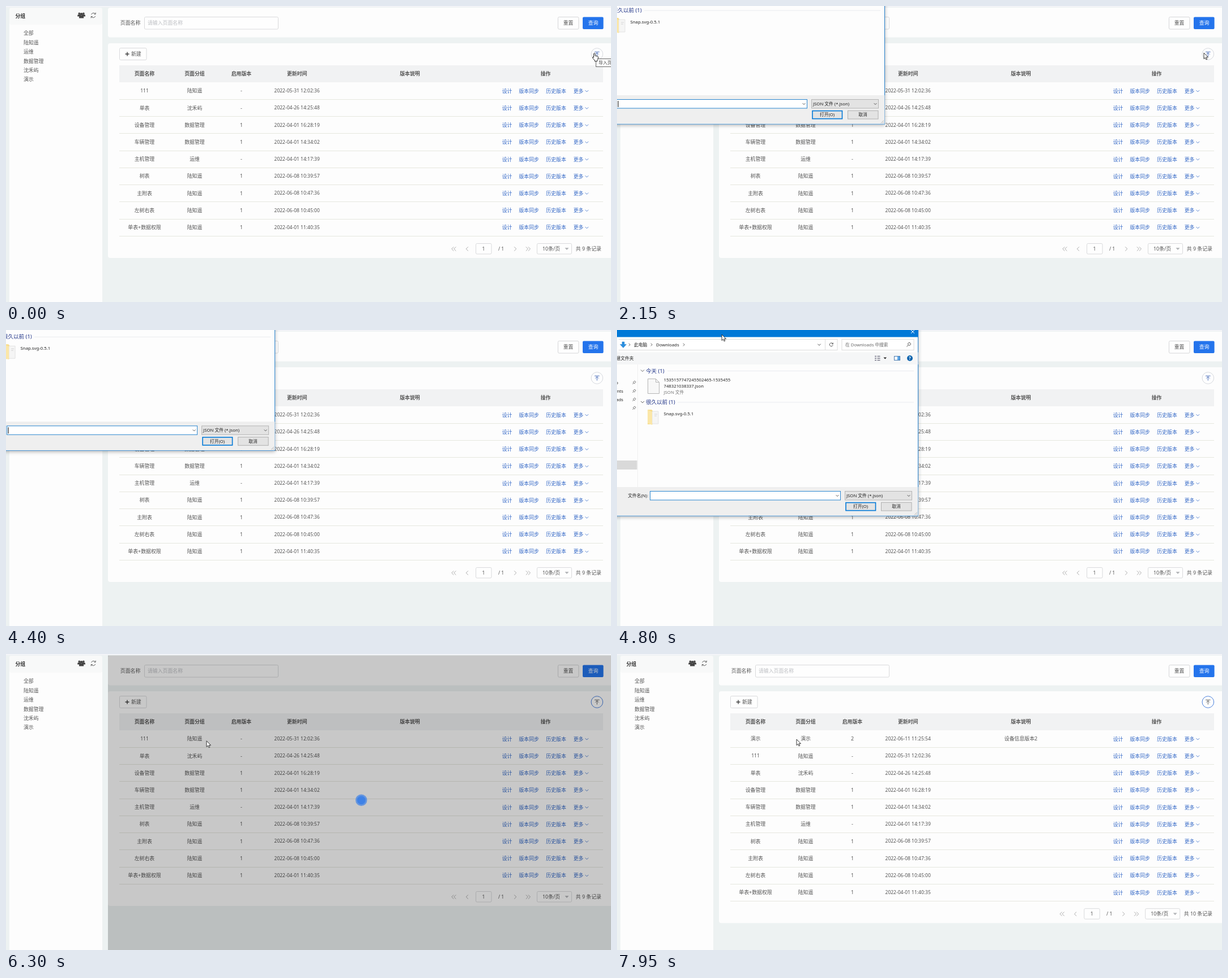
Write an HTML page that moves like this. It is 1068 px wide and 524 px high and loops after 8000 ms.

```html
<!DOCTYPE html>
<html lang="zh-CN">
<head>
<meta charset="utf-8">
<style>
html, body { margin: 0; width: 100%; height: 100%; overflow: hidden; background: #edf2f2; }
svg { display: block; width: 100%; height: 100%; }
text { font: 8.9px "Noto Sans", "Noto Sans CJK SC", "Noto Sans CJK", sans-serif; white-space: pre; }
</style>
</head>
<body>
<svg id="stage" viewBox="0 0 1068 524" xmlns="http://www.w3.org/2000/svg"></svg>
<script>
const BLUE = '#2474ec', LINK = '#3267c6', INK = '#555', WIN = '#0078d7';
const LOOP = 8000;

// Markup helpers; text y is the visual middle of the line
const rect = (x, y, w, h, fill, stroke = 'none', rx = 0, more = '') =>
  `<rect x="${x}" y="${y}" width="${w}" height="${h}" fill="${fill}" stroke="${stroke}" rx="${rx}" ${more}/>`;
const path = (d, stroke, width = 1, fill = 'none', more = '') =>
  `<path d="${d}" stroke="${stroke}" stroke-width="${width}" fill="${fill}" ${more}/>`;
const text = (x, y, s, o = {}) => {
  const { size = 8.9, fill = INK, anchor = 'start', bold = 0 } = o;
  return `<text x="${x}" y="${y + size * .37}" fill="${fill}" text-anchor="${anchor}" ` +
    `style="font-size:${size}px;font-weight:${bold ? 700 : 400}">${s}</text>`;
};
const mid = (x, y, s, o) => text(x, y, s, { anchor: 'middle', ...o });
const chevron = (x, y, dx, dy, color, w = 1) => dx
  ? path(`M${x - dx} ${y - dy}L${x + dx} ${y}L${x - dx} ${y + dy}`, color, w)
  : path(`M${x - dy} ${y - dy / 2}L${x} ${y + dy / 2}L${x + dy} ${y - dy / 2}`, color, w);
const group = (id, s) => `<g id="${id}">${s}</g>`;

const ANN = '陆知遥', BEN = '沈禾屿', DATA = '数据管理';
const oldRows = [
  ['111', ANN, '-', '2022-05-31 12:02:36'],
  ['单表', BEN, '-', '2022-04-26 14:25:48'],
  ['设备管理', DATA, '1', '2022-04-01 16:28:19'],
  ['车辆管理', DATA, '1', '2022-04-01 14:34:02'],
  ['主机管理', '运维', '-', '2022-04-01 14:17:39'],
  ['树表', ANN, '1', '2022-06-08 10:39:57'],
  ['主附表', ANN, '1', '2022-06-08 10:47:36'],
  ['左树右表', ANN, '1', '2022-06-08 10:45:00'],
  ['单表+数据权限', ANN, '1', '2022-04-01 11:40:35']
];
const newRows = [['演示', '演示', '2', '2022-06-11 11:25:54', '设备信息版本2'], ...oldRows];
const columns = [244.5, 333, 415.5, 513.7, 713];

function person(x, y, r) {
  return `<circle cx="${x}" cy="${y}" r="${r}"/>` +
    `<path d="M${x - r * 1.7} ${y + r * 3}v${-r}q0 ${-r} ${r} ${-r}h${r * 1.4}q${r} 0 ${r} ${r}v${r}z"/>`;
}

function sidebar() {
  const items = ['全部', ANN, '运维', DATA, BEN, '演示'];
  return rect(6, 3, 164, 540, '#fdfdfd', 'none', 4) + rect(6, 3, 164, 30, '#f8f9f9', 'none', 4) +
    text(16.5, 17.5, '分组', { bold: 1, fill: '#333' }) +
    `<g fill="#444">${person(129.3, 13.2, 1.8)}${person(136.9, 13.2, 1.8)}${person(133.1, 14.3, 2.4)}</g>` +
    path('M150.6 15.2a4 4 0 0 1 7.2-1M157.8 17.8a4 4 0 0 1-7.2 1M158.2 11.6v2.8h-2.8M150.2 21.4v-2.8h2.8', '#555', .9) +
    items.map((s, i) => text(31, 48.2 + i * 16.4, s)).join('');
}

function searchBar() {
  return rect(180, 3, 900, 52.5, '#fdfdfd', 'none', 4) +
    text(201.8, 30, '页面名称') + rect(244.5, 19.5, 236, 21.5, '#fefefe', '#d9dadc', 2) +
    text(250, 30, '请输入页面名称', { fill: '#bcbec2' }) +
    rect(974.5, 19.5, 36.5, 21.5, '#fefefe', '#d5d6d8', 2) + mid(992.5, 30, '重置') +
    rect(1018, 19.5, 36.6, 21.5, BLUE, 'none', 2) + mid(1036.5, 30, '查询', { fill: '#fff' });
}

function pager(count) {
  const extra = count - 9, y = 430 + extra * 30.2, g = '#aaa';
  const arrows = chevron(788.5, y, -1.8, 3.6, g) + chevron(792.5, y, -1.8, 3.6, g) +
    chevron(814, y, -1.8, 3.6, g) + chevron(899, y, 1.8, 3.6, g) +
    chevron(919.7, y, 1.8, 3.6, g) + chevron(923.7, y, 1.8, 3.6, g);
  return `<g transform="translate(${-4.8 * extra})">` + arrows +
    rect(829.5, y - 9.5, 27.5, 18.5, '#fefefe', '#d9dadc', 2) + mid(843, y, '1', { size: 8.5 }) +
    mid(874, y, '/ 1', { size: 8.5 }) +
    rect(937.5, y - 9.5, 61, 18.5, '#fefefe', '#d9dadc', 2) + text(947, y, '10条/页') +
    path(`M986.5 ${y - 2}h7l-3.5 4z`, 'none', 0, '#b5b7ba') + '</g>' +
    text(1051, y, `共 ${count} 条记录`, { anchor: 'end' });
}

function table(rows) {
  const heads = ['页面名称', '页面分组', '启用版本', '更新时间', '版本说明'];
  let s = rect(180, 66, 900, 108 + rows.length * 30.22, '#fdfdfd', 'none', 4) +
    rect(200.5, 74.5, 47.5, 21, '#fefefe', '#d9dadc', 2) +
    path('M210.5 85h7M214 81.5v7', '#444', 1.5) + text(221, 85, '新建') +
    rect(200, 105, 854, 30, '#f1f2f3') +
    heads.map((h, i) => mid(columns[i], 119.7, h, { bold: 1 })).join('') +
    mid(952.5, 119.7, '操作', { bold: 1 });
  rows.forEach((row, i) => {
    const y = 150 + i * 30.22;
    s += row.map((c, k) => mid(columns[k], y, c, { size: k == 3 || c == '111' ? 8.5 : 8.9 })).join('') +
      [[875.7, '设计'], [905.5, '版本同步'], [953.3, '历史版本'], [1001.7, '更多']]
        .map(([x, c]) => text(x, y + .4, c, { fill: LINK })).join('') +
      chevron(1025.3, y + .6, 0, 2.8, LINK, .8) +
      path(`M200 ${Math.round(y + 15) + .5}H1054`, '#e6e7df');
  });
  return s + pager(rows.length);
}

function importIcon(ring, arrow) {
  return `<circle cx="1043.3" cy="85" r="10.3" fill="#fefefe" stroke="${ring}"/>` +
    path('M1039 81.3h8.6M1043.3 89.5v-7M1040.3 85.7l3-3 3 3', arrow, .9);
}

// Dialog drawn at its resting place
function dialog() {
  const small = { size: 7.75, fill: '#222' }, end = { ...small, anchor: 'end' };
  const header = (id, y, label, width) =>
    rect(50, y - 8.5, 491, 17, '#e5f3ff', 'none', 0, `id="${id}"`) +
    chevron(55, y, 0, 3, '#555', .9) + text(61, y, label, { size: 9.5, fill: '#1e3287' }) +
    path(`M${61 + width} ${y + .5}H534`, '#e9ebef');
  const nav = [[6, 96.5, '快速访问'], [12, 112, 'Desktop'], [21, 127, 'Documents'], [21, 142, 'Downloads'],
    [9, 157, 'Pictures'], [9, 238, 'Archive']];
  const pin = y => path(`M37.5 ${y + 3}l2.2-2.4m-1.7-1.6l3.4 3.4m-2.6-3.2l2.4-2.2 2 2-2.2 2.4`, '#777', 1);
  const frame = rect(-120, 13.5, 661.5, 334.5, '#fdfdfd', '#2680cc', 0, 'filter="url(#shadow)"') +
    rect(-120, 13, 662, 18.5, WIN) + path('M529 19l6 6M535 19l-6 6', '#fff', 1);
  const address = rect(-30, 35.5, 407.5, 19, '#fff', '#dcdcdc') + rect(377.5, 35.5, 21.5, 19, '#fff', '#dcdcdc') +
    rect(407, 35.5, 127, 19, '#fff', '#dcdcdc') +
    rect(-31, 32, 44, 26, '#fdfdfd') + path('M5.5 49v-7.5M2.5 44.5l3-3 3 3', '#555', 1) +
    path('M19 40h4v4.5h3.5L21 50.5l-5.5-6H19z', '#1979ca', .5, '#2b8fe0') +
    [32, 71, 128].map(x => chevron(x, 45, 1.2, 2.4, '#555', .9)).join('') +
    text(40, 45, '此电脑', small) + text(79, 45, 'Downloads', small) +
    chevron(367, 45, 0, 2.6, '#555', 1) +
    path('M391 43.5a3 3 0 1 0 .2 2.2M391.3 41.5v2.3h-2.3', '#444', .9) +
    text(413, 45, '在 Downloads 中搜索', { ...small, fill: '#666' }) +
    path('M521.5 48.5l2.6-2.8m.2-.2a2.4 2.4 0 1 0 3.4-3.4a2.4 2.4 0 1 0-3.4 3.4', '#555', 1);
  const tools = rect(-119, 58.5, 660.5, 21.5, '#f5f6f7') + text(39.5, 69, '新建文件夹', end) +
    [65.5, 69, 72.5].map(y => path(`M465 ${y}h3M469.5 ${y}h5`, '#778', 1.4)).join('') +
    path('M480.5 67.5h5.5l-2.7 3z', 'none', 0, '#222') +
    rect(499.5, 65.5, 10, 7, '#fff', '#4a7bb0') + rect(505, 66, 4, 6, '#5aa5e6') +
    '<circle cx="527" cy="69" r="5" fill="#0a63ad"/>' + mid(527, 69, '?', { size: 8, fill: '#fff', bold: 1 });
  const side = rect(-119, 250, 164.5, 16, '#d9d9d9') + path('M46.5 80V297', '#f0f0f0') +
    nav.map(([x, y, s]) => text(x, y, s, end)).join('') + [112, 127, 142, 157].map(pin).join('');
  const files = header('todayHover', 91, '今天 (1)', 38) + header('oldHover', 146.5, '很久以前 (1)', 56) +
    rect(57, 101, 157, 35.5, '#e1f1fd', 'none', 0, 'id="fileHover"') +
    path('M64.5 105.5h14l6 6v20h-20z', '#b5b5b5', 1, '#f7f7f7') + path('M78.5 105.5v6h6', '#b5b5b5') +
    text(92.5, 107.2, '1535157747245502465-1535455', small) + text(92.5, 118.2, '748321038337.json', small) +
    text(92.5, 129.2, 'JSON 文件', { ...small, fill: '#777' }) +
    path('M64 160h7l2 2v24h-9z', 'none', 0, '#f7dc8c') + path('M72 163h11v22h-11z', '#ddd', .8, '#f5f5f5') +
    path('M64 160l8 4v23l-8-3z', 'none', 0, '#fbe7a8') + path('M76 168h5M76 171h4', '#ccc', .8) +
    text(92.5, 167, 'Snap.svg-0.5.1', small);
  const foot = rect(-119, 297, 660.5, 50.5, '#efefef') + text(65, 312, '文件名(N):', end) +
    rect(68.5, 304.5, 336, 15.5, '#fff', '#2b86cf') + chevron(399, 312.3, 0, 2.4, '#444', .9) +
    path('M71 307v11', '#000', 1, 'none', 'id="caret"') +
    rect(412.5, 304.5, 118, 15.5, '#e3e3e3', '#b5b5b5') + text(415, 312, 'JSON 文件 (*.json)', small) +
    chevron(525, 312.3, 0, 2.4, '#444', .9) +
    rect(414, 324.6, 52.5, 14, '#e3e3e3', WIN, 0, 'stroke-width="1.6"') + mid(440, 331.5, '打开(O)', small) +
    rect(476.5, 324.3, 53.5, 14.7, '#e3e3e3', '#b0b0b0') + mid(503, 331.5, '取消', small) +
    path('M535 346.5l5-5M538 346.5l2-2', '#b5b5b5', 1);
  return frame + address + tools + side + files + foot;
}

const loading = rect(180, 2.5, 900, 530, '#000', 'none', 0, 'opacity=".21"') +
  `<g fill="${BLUE}" fill-opacity=".6"><circle id="dotA" cx="627.2" cy="258.7"/><circle id="dotB" cx="627.2" cy="258.7"/></g>`;
const tooltip = rect(1041.5, 93.5, 60, 14, '#fff', '#666') + text(1046, 100.5, '导入页面', { size: 7.75, fill: '#444' });
const arrow = path('M0 0V10.6L2.5 8.3L4.1 12L5.8 11.2L4.2 7.7H7.5z', '#222', .9, '#fff');
const hand = path('M2.5 8V1.2q1.2-1.6 2.4 0V5l4.4 1q1.2.4 1.2 2l-.8 3.4-.9 1.4v2H4.2v-1.6L1 9.6Q-.4 7.6 1 7.2z', '#222', 1, '#fff');

const stage = document.getElementById('stage');
stage.innerHTML =
  '<defs><filter id="shadow" x="-5%" y="-5%" width="110%" height="115%">' +
  '<feDropShadow dx="0" dy="2" stdDeviation="3" flood-color="#000" flood-opacity=".28"/></filter></defs>' +
  rect(0, 0, 1068, 524, '#edf2f2') + rect(0, 0, 1068, 2, '#f3f4f8') + sidebar() + searchBar() +
  group('before', table(oldRows)) + group('after', table(newRows)) +
  group('iconIdle', importIcon('#d6d9de', '#3d63b5')) + group('iconFocus', importIcon('#4a80dc', '#555')) +
  group('busy', loading) + group('tip', tooltip) + group('dialog', dialog()) +
  group('hand', hand) + group('arrow', arrow);

const el = {};
stage.querySelectorAll('[id]').forEach(n => el[n.id] = n);
const show = (id, on) => el[id].style.display = on ? '' : 'none';
const place = (id, [x, y]) => el[id].setAttribute('transform', `translate(${x} ${y})`);
const ease = u => u * u * (3 - 2 * u);

// Keys are [time, x, y]
function along(keys, t) {
  const i = keys.findIndex(k => k[0] > t);
  if (i < 0) return keys[keys.length - 1].slice(1);
  if (i == 0) return keys[0].slice(1);
  const [a, b] = [keys[i - 1], keys[i]], u = ease((t - a[0]) / (b[0] - a[0]));
  return [1, 2].map(k => a[k] + (b[k] - a[k]) * u);
}

const windowKeys = [[4350, -69, -139], [4800, -10, -19], [5050, 0, 0]];
const pointerKeys = [[2150, 1036, 83], [3050, 221, 12], [3150, 221, 12], [3600, 180, -40], [4200, 126, -112],
  [4350, 126, -112], [4800, 185, 8], [5050, 195, 27], [5400, 157.5, 109.5], [5850, 157.5, 109.5],
  [6350, 359.5, 155], [7150, 359.5, 155], [7650, 317, 151]];

function draw(t) {
  const [wx, wy] = along(windowKeys, t), [px, py] = along(pointerKeys, t);
  const x = px - wx, y = py - wy;
  const done = t >= 7100;
  show('before', !done);
  show('after', done);
  show('iconIdle', t < 5800);
  show('iconFocus', t >= 5800);
  show('tip', t < 1700);
  show('busy', t >= 5950 && !done);
  const swell = (1 + Math.cos((t - 6850) / 1000 * Math.PI)) / 2;
  el.dotA.setAttribute('r', 17.7 * swell);
  el.dotB.setAttribute('r', 17.7 * (1 - swell));

  show('dialog', t >= 2100 && t < 5800);
  place('dialog', [wx, wy]);
  show('todayHover', y > 82 && y < 100);
  show('oldHover', y > 138 && y < 156);
  show('fileHover', x > 57 && x < 214 && y > 101 && y < 136);
  show('caret', t >= 2100 && (t - 880) % 1060 < 530);

  show('hand', t < 2100);
  show('arrow', t >= 2100);
  place('hand', [px - 1, py]);
  place('arrow', [px, py]);
}

function tick() {
  draw(performance.now() % LOOP);
  requestAnimationFrame(tick);
}
tick();
</script>
</body>
</html>
```
